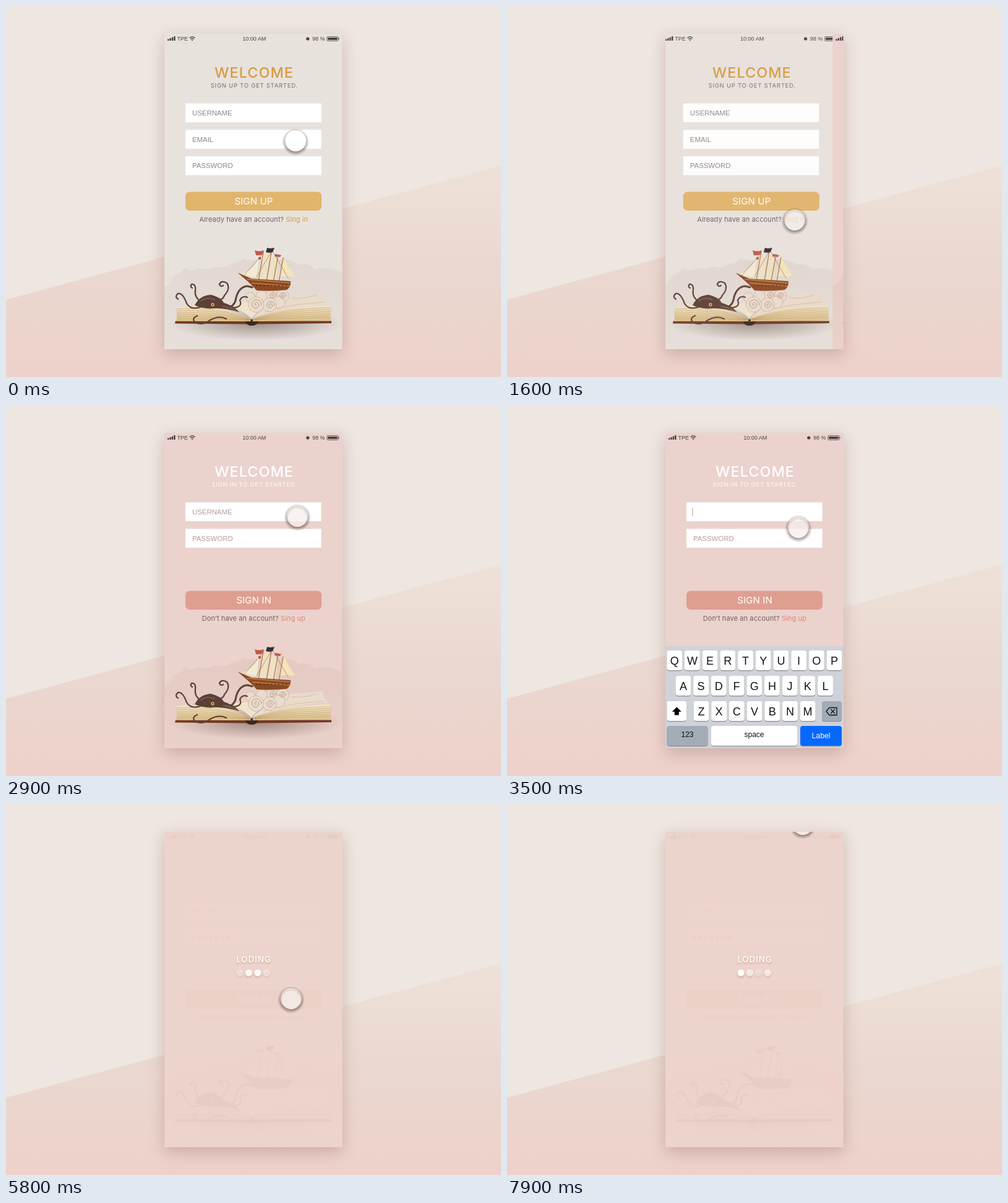
An HTML page that plays this animation: 800x600 px, repeating every 8000 ms.

```html
<!DOCTYPE html>
<html lang="en">
<head>
<meta charset="utf-8">
<title>Sign in flow</title>
<style>
  html, body { margin: 0; width: 100%; height: 100%; overflow: hidden; background: #eee6e0; }
  svg { display: block; width: 800px; height: 600px; }
  text { font-family: "Liberation Sans", Arial, sans-serif; }
  .geo { font-family: Inter, Roboto, sans-serif; }
  .mid { text-anchor: middle; }
  .title { font-size: 23.3px; letter-spacing: 1.1px; font-weight: 500; }
  .sub { font-size: 9.5px; letter-spacing: .75px; }
  .button { font-size: 15px; letter-spacing: .15px; fill: #fff; }
  .note { font-size: 11px; letter-spacing: .1px; fill: #6d6361; }
  .hint { font-size: 11.4px; }
  .status { font-size: 9px; fill: #48423f; }
  .line { fill: none; stroke-linecap: round; stroke-linejoin: round; }
  #phone { filter: drop-shadow(0 8px 13px rgba(145, 100, 88, .36)); }
  #loading { filter: drop-shadow(0 2px 1.5px rgba(150, 85, 70, .35)); }
</style>
</head>
<body>
<svg viewBox="0 0 800 600">
  <defs>
    <linearGradient id="floor" x2="0" y2="1">
      <stop offset="0" stop-color="#eee0d8"/>
      <stop offset=".5" stop-color="#ead8d0"/>
      <stop offset="1" stop-color="#edd1ca"/>
    </linearGradient>
    <linearGradient id="pages" x2="0" y2="1">
      <stop offset="0" stop-color="#f1e4c6"/>
      <stop offset="1" stop-color="#dcc08a"/>
    </linearGradient>
    <linearGradient id="stain" x2="0" y2="1">
      <stop offset="0" stop-color="#b59a82" stop-opacity=".14"/>
      <stop offset="1" stop-color="#b59a82" stop-opacity=".03"/>
    </linearGradient>
    <radialGradient id="under">
      <stop offset="0" stop-color="#5a4640" stop-opacity=".48"/>
      <stop offset="1" stop-color="#5a4640" stop-opacity="0"/>
    </radialGradient>
    <!-- Hollow, so that it does not darken the translucent pointer -->
    <radialGradient id="halo">
      <stop offset=".67" stop-color="#3c231e" stop-opacity="0"/>
      <stop offset=".69" stop-color="#3c231e" stop-opacity=".48"/>
      <stop offset="1" stop-color="#3c231e" stop-opacity="0"/>
    </radialGradient>
    <clipPath id="glass"><rect x="256" y="45" width="287.5" height="510"/></clipPath>

    <g id="statusBar" class="status">
      <path d="M261 53.5h2.4v2.5h-2.4zM264.4 52h2.4v4h-2.4zM267.8 50.5h2.4v5.5h-2.4zM271.2 49h2.4v7h-2.4z"/>
      <text x="276.5" y="56">TPE</text>
      <g class="line" stroke="#48423f" stroke-width="1.3">
        <path d="M297 51.4q4-3.6 8 0M298.7 53.4q2.3-2 4.6 0"/>
      </g>
      <circle cx="301" cy="55.2" r="1"/>
      <text x="401.3" y="56" class="mid">10:00 AM</text>
      <circle cx="487.7" cy="53" r="2.6"/>
      <text x="495" y="56">98 %</text>
      <rect x="518.8" y="49.5" width="18" height="7" rx="1.5" fill="none" stroke="#48423f" stroke-width=".8"/>
      <path d="M520.2 50.9h15.2v4.2h-15.2zM537.4 51.6h1v2.8h-1z"/>
    </g>

    <g id="art">
      <ellipse cx="405" cy="514" rx="138" ry="27" fill="url(#under)"/>
      <path d="M274 509.5H526V513L408 514.5H386L273 513.5Z" fill="#74381f"/>
      <path d="M386 507h22q-1 10-11 10t-11-10z" fill="#3d2620"/>
      <path d="M276 487Q345 481 394 506L396 510 276 509.5Z" fill="url(#pages)"/>
      <path d="M524 484Q450 486 401 505L398 510 525 508.5Z" fill="url(#pages)"/>
      <path d="M338 485Q374 483 396 505L410 492 400 480 372 482Z" fill="#f0e3cc"/>
      <path d="M396 506Q430 478 456 467Q492 466 511 462Q512 473 520 481Q450 486 396 506Z" fill="#e9dbcb"/>
      <path d="M462 472Q485 474 502 467M418 495Q452 483 513 479" class="line" stroke="#cfb794" stroke-width=".7"/>
      <g id="leaves" class="line" stroke="#a98248" stroke-width=".6" stroke-opacity=".65"></g>
      <g fill="#e9dccf" stroke="#c8aa91" stroke-width=".7">
        <circle cx="430" cy="468" r="10"/><circle cx="447" cy="469" r="10"/>
        <circle cx="413" cy="469" r="9"/><circle cx="395" cy="471" r="8"/>
        <circle cx="441" cy="479" r="10"/><circle cx="426" cy="483" r="11"/>
        <circle cx="404" cy="483" r="12.5"/>
      </g>
      <g id="curls" class="line" stroke="#b7957a" stroke-width="1"></g>

      <path d="M409 407Q400 426 382 433Q396 439 405 438Z" fill="#f4ead1"/>
      <path d="M449 407Q457 423 467 437H441Z" fill="#f3e4b9"/>
      <path d="M415 404L427 399 420 441 407 442ZM430 404L440 408 436 442 422 442Z" fill="#eee0c4"/>
      <path d="M416 397L408 445M430 391L421 446M440 402L432 446M448 407L441 446" class="line" stroke="#b0793f" stroke-width="1.3"/>
      <path d="M376 432L405 446M416 400L385 435M430 395L456 440M429 397L405 438" class="line" stroke="#83502d" stroke-width=".5"/>
      <path d="M375 432L397 441 460 445Q461 454 454 459Q430 462 405 460Q397 450 375 432Z" fill="#8a4824"/>
      <path d="M390 442L460 448M398 448L458 453" class="line" stroke="#c68241" stroke-width="1.4"/>
      <path d="M404 452H454" stroke="#4b291b" stroke-width="1.5" stroke-dasharray="2 4"/>
      <path d="M402 395Q409 398 417 395L414 402Q409 404 404 403ZM435 401L445 403 443 406 434 405ZM408 406h4v4h-4z" fill="#bd5a4c"/>
      <path d="M422 391Q428 393 434 391L431 398Q426 400 420 398Z" fill="#353033"/>

      <g class="line" stroke="#604437" stroke-width="2.3">
        <path d="M317 486Q299 493 292 481Q286 464 278 465Q272 470 278 474"/>
        <path d="M316 479Q304 471 306 460Q307 449 300 450Q297 454 301 456"/>
        <path d="M338 476Q351 476 353 468Q363 457 357 448Q348 443 345 450Q347 455 351 452"/>
        <path d="M354 488Q370 488 372 471Q377 454 390 453L398 455" stroke-width="3"/>
        <path d="M367 488Q383 487 378 476Q382 468 390 471"/>
        <path d="M309 501Q299 505 306 512Q318 517 330 508Q344 500 356 506"/>
      </g>
      <path d="M305 484Q313 468 331 467Q348 471 352 480Q367 484 377 495Q353 488 337 489Q321 491 305 484Z" fill="#5b4036"/>
      <path d="M315 477Q325 470 337 475M351 486Q363 487 372 493" class="line" stroke="#8a6654" stroke-width="1.4"/>
      <circle cx="334" cy="483" r="2.7" fill="#e6b04b"/><circle cx="334" cy="483" r="1" fill="#33231f"/>
    </g>

    <path id="wash" d="M256 454Q267 450 270 437Q282 434 288 424Q299 431 313 424Q326 428 338 421Q352 426 365 416Q376 418 382 408Q399 414 423 410Q452 405 475 419Q488 414 499 426Q519 421 543 431V555H256Z"/>
  </defs>

  <path d="M0 475L800 258V600H0Z" fill="url(#floor)"/>
  <rect id="phone" x="256" y="45" width="287.5" height="510" fill="#ebd3cd"/>
  <g clip-path="url(#glass)">
    <g id="signUp"></g>
    <g id="signIn"></g>
    <g id="keyboard"></g>
    <rect id="veil" x="256" y="45" width="287.5" height="510" fill="#ecd3cc"/>
    <g id="loading">
      <text x="400.4" y="256" class="geo mid" font-size="13.5" letter-spacing=".9" font-weight="500" fill="#fff">LODING</text>
      <g id="beads" fill="#fff"></g>
    </g>
    <g id="pointer">
      <circle cy="2" r="22" fill="url(#halo)"/>
      <circle id="disc" r="17"/>
    </g>
  </g>
</svg>
<script>
const $ = id => document.getElementById(id);
const range = n => [...Array(n).keys()];
const clamp = x => Math.max(0, Math.min(1, x));
const smooth = x => x * x * (3 - 2 * x);
const progress = (t, start, length) => smooth(clamp((t - start) / length));

const rect = (x, y, w, h, fill, r = 0) =>
  `<rect x="${x}" y="${y}" width="${w}" height="${h}" rx="${r}" fill="${fill}"/>`;
const label = (x, y, cls, content, attrs = '') =>
  `<text x="${x}" y="${y}" class="${cls}" ${attrs}>${content}</text>`;

function screen(s) {
  const fields = s.fields.map((name, i) => {
    const y = 157.5 + i * 42.8;
    return rect(290, y, 219.5, 30.5, '#fff') +
      label(301, y + 19.3, 'hint', name, `id="${s.id}${name}" fill="${s.hint}"`);
  }).join('');
  return rect(256, 45, 287.5, 510, s.paper) +
    '<use href="#wash" fill="url(#stain)"/>' +
    '<use href="#statusBar"/><use href="#art"/>' +
    label(401, 116, 'geo mid title', 'WELCOME', `fill="${s.title}"`) +
    label(401.3, 131.5, 'geo mid sub', `${s.action} TO GET STARTED.`, `fill="${s.sub}"`) +
    fields + rect(290, 300.5, 220, 30.5, s.button, 7) +
    label(400.5, 321.3, 'geo mid button', s.action) +
    label(400.3, 349.3, 'geo mid note',
      `${s.question} <tspan fill="${s.link}">${s.other}</tspan>`);
}

$('signUp').innerHTML = screen({
  id: 'up', paper: '#e8e2dd', title: '#d69b42', sub: '#77706c', hint: '#8b8785',
  fields: ['USERNAME', 'EMAIL', 'PASSWORD'], action: 'SIGN UP', button: '#e1b56c',
  question: 'Already have an account?', other: 'Sing in', link: '#d79b42'
});
$('signIn').innerHTML = screen({
  id: 'in', paper: '#ebd2cc', title: '#fff', sub: '#fff8f5', hint: '#b49d97',
  fields: ['USERNAME', 'PASSWORD'], action: 'SIGN IN', button: '#df9f90',
  question: 'Don’t have an account?', other: 'Sing up', link: '#dd8777'
}) + label(299, 178, 'geo', '', 'id="userName" font-size="14" fill="#dc9786"') +
  '<g id="secret" fill="#df9a89"></g>' +
  '<rect id="caret" width="1" height="14"/>';

// Page edges and wave spirals
$('leaves').innerHTML = range(6).map(i => {
  const y = 490 + i * 3.2;
  return `<path d="M276 ${y}Q345 ${y - 4 + i * .6} 393 ${506 + i * .5}M525 ${y - 2}Q450 ${y - 1} 402 ${506 + i * .4}"/>`;
}).join('');
const spiral = (x, y, size) => '<polyline points="' + range(31).map(i => {
  const a = i * .42, r = size * i / 30;
  return `${(x + r * Math.cos(a)).toFixed(1)},${(y + r * Math.sin(a)).toFixed(1)}`;
}).join(' ') + '"/>';
$('curls').innerHTML = spiral(404, 483, 9) + spiral(427, 484, 7) + spiral(431, 468, 6) + spiral(447, 469, 6);

function key(x, y, w, name, fill = '#fff', size = 18, color = '#111') {
  const baseline = y + (size > 15 ? 22.7 : fill === '#0568ff' ? 20 : 18);
  return rect(x, y + 1.2, w, 32, '#898d95', 4) + rect(x, y, w, 32, fill, 4) +
    label(x + w / 2, baseline, 'mid', name, `font-size="${size}" fill="${color}"`);
}
const keyRow = (letters, x, y) =>
  [...letters].map((c, i) => key(x + i * 28.7, y, 24.8, c)).join('');
$('keyboard').innerHTML = rect(256, 390, 287.5, 165, '#d0d2d9') +
  keyRow('QWERTYUIOP', 258.3, 397) + keyRow('ASDFGHJKL', 272.5, 438) + keyRow('ZXCVBNM', 301.5, 479) +
  key(258.5, 479, 31.5, '') + key(509, 479, 32, '', '#a3abb6') +
  key(258.5, 519, 66, '123', '#a3abb6', 12) + key(330, 519, 139, 'space', '#fff', 12) +
  key(474, 519, 67, 'Label', '#0568ff', 12.2, '#fff') +
  '<path d="M274.3 488.5l7.5 7.5h-4v5.5h-7v-5.5h-4z"/>' +
  '<g class="line" stroke="#111" stroke-width="1.3"><path d="M521 489.5h12v12h-12l-5-6zM523.5 492.5l6 6M529.5 492.5l-6 6"/></g>';

const route = [
  [0, 468, 218], [1300, 465, 347], [1600, 465, 346], [2000, 463, 345], [2900, 471, 180],
  [3200, 471, 182], [3500, 471, 198], [4100, 469, 220], [4400, 468, 220], [5400, 462, 316],
  [6100, 460, 314], [6800, 464, 240], [7250, 496, 150], [7750, 478, 54], [7900, 478, 33], [8000, 478, 25]
];
function pointerAt(t) {
  const i = route.findIndex(p => p[0] > t);
  const [t0, x0, y0] = route[i - 1], [t1, x1, y1] = route[i];
  const k = progress(t, t0, t1 - t0);
  return [x0 + (x1 - x0) * k, y0 + (y1 - y0) * k];
}

function draw(t) {
  const push = progress(t, 1500, 670);
  $('signUp').setAttribute('transform', `translate(${-86 * push})`);
  $('signUp').setAttribute('opacity', 1 - push);
  $('signUp').style.display = push < 1 ? '' : 'none';
  $('signIn').setAttribute('transform', `translate(${287.5 * (1 - push)})`);
  $('signIn').style.display = push > 0 ? '' : 'none';

  const lift = progress(t, 2900, 400) * (1 - progress(t, 5400, 300));
  $('keyboard').setAttribute('transform', `translate(0 ${165 * (1 - lift)})`);

  const name = 'Norda'.slice(0, Math.max(0, Math.floor((t - 3500) / 120)));
  const dots = Math.floor(7 * clamp((t - 4300) / 600));
  const onPassword = t >= 4300;
  $('inUSERNAME').style.display = t < 3000 ? '' : 'none';
  $('inPASSWORD').style.display = onPassword ? 'none' : '';
  $('userName').textContent = name;
  $('secret').innerHTML = range(dots).map(i =>
    `<circle cx="${303.3 + i * 9.2}" cy="216" r="3.6"/>`).join('');
  const caret = $('caret');
  caret.style.display = t >= 3000 && t < 5500 ? '' : 'none';
  caret.setAttribute('x', onPassword ? 300 + dots * 9.3 : 299.5 + (name ? $('userName').getComputedTextLength() + 1 : 0));
  caret.setAttribute('y', onPassword ? 209 : 166);
  caret.setAttribute('fill', onPassword ? '#aaa3a1' : '#dc9786');

  const fade = progress(t, 5400, 400);
  $('veil').setAttribute('opacity', .95 * fade);
  $('loading').setAttribute('opacity', fade);
  $('beads').innerHTML = range(4).map(i => {
    const alpha = .67 + .33 * Math.cos(2 * Math.PI * ((t - 6600) / 1300 - i / 4));
    return `<circle cx="${378 + i * 14.4}" cy="273" r="5.6" fill-opacity="${alpha}"/>`;
  }).join('');

  const press = progress(t, 1200, 300);
  $('pointer').setAttribute('transform', `translate(${pointerAt(t)})`);
  $('disc').setAttribute('fill', press > .5 ? '#f6efed' : '#fff');
  $('disc').setAttribute('fill-opacity', 1 - .24 * press);
}

function tick() {
  draw(Math.floor(performance.now() % 8000 / 100) * 100);
  requestAnimationFrame(tick);
}
tick();
</script>
</body>
</html>
```
